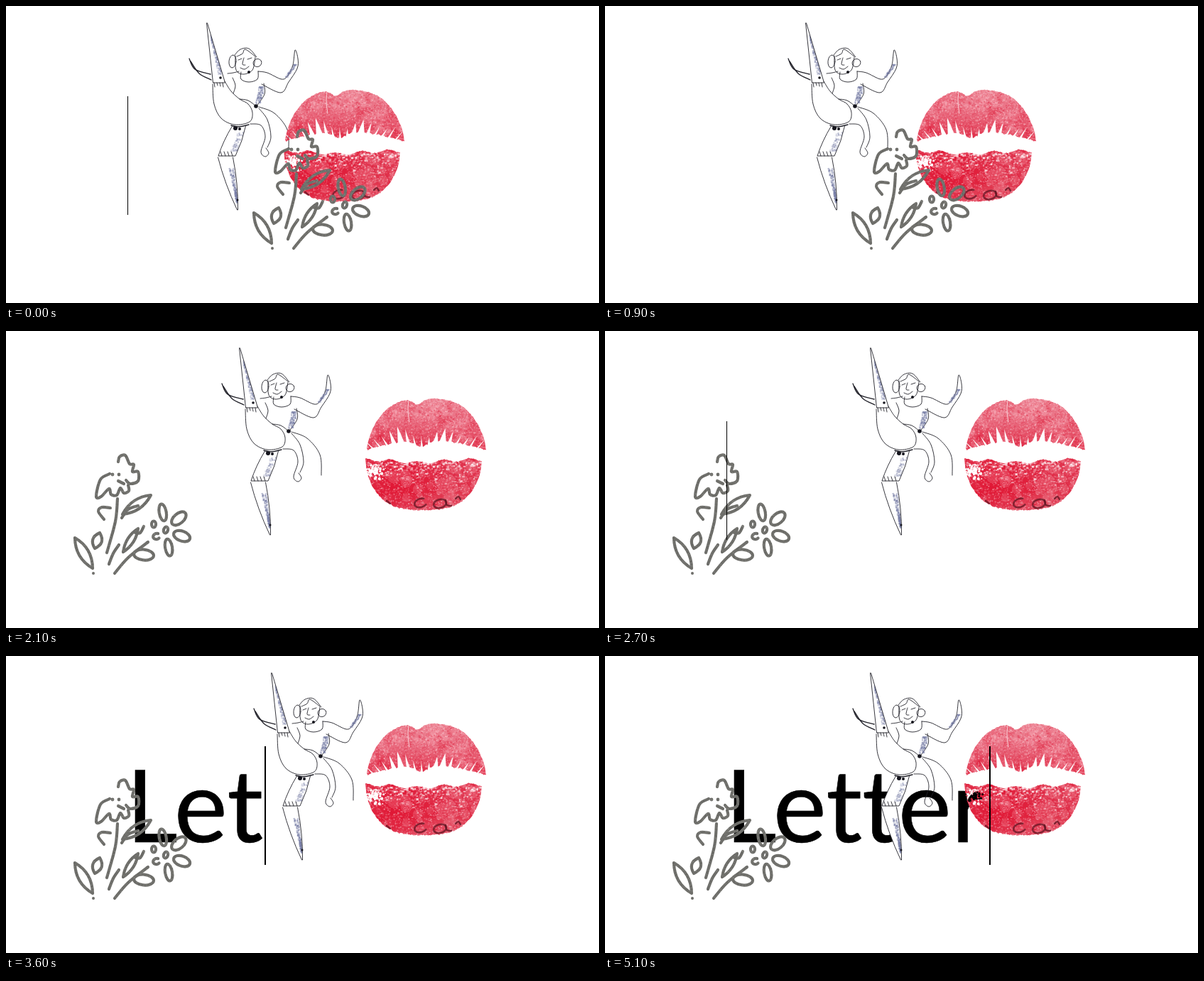
An HTML page with a canvas that plays this animation: 835 px wide and 418 px high, repeating every 5400 ms.

```html
<!DOCTYPE html>
<html lang="en">
<head>
<meta charset="utf-8">
<title>Letter</title>
<style>
html, body { margin: 0; width: 100%; height: 100%; overflow: hidden; background: #fff; }
body { position: relative; }
canvas, #word, #caret { position: absolute; left: 0; top: 0; }
#word {
  left: 169px; top: 121.5px; color: #000; white-space: pre;
  font: 142px/170px Lato, "Open Sans", sans-serif;
  font-variant-ligatures: none; -webkit-text-stroke: .6px #000;
}
#caret { top: 127px; width: 1.4px; height: 167px; background: #000; }
</style>
</head>
<body>
<div id="word"></div>
<canvas id="art" width="835" height="418"></canvas>
<div id="caret"></div>
<script>
const STEP = 300, STEPS = 18, WORD = "Letter";
const word = document.getElementById("word");
const caret = document.getElementById("caret");
const art = document.getElementById("art").getContext("2d");

let seed = 7;
const rnd = () => (seed = (seed * 16807) % 2147483647) / 2147483647;
const spread = (a, b) => a + (b - a) * rnd();
const hump = (u, at, width) => Math.exp(-(((u - at) / width) ** 2));

function layer(draw) {
  const c = document.createElement("canvas");
  c.width = 835;
  c.height = 418;
  const g = c.getContext("2d");
  g.lineCap = g.lineJoin = "round";
  draw(g);
  return c;
}

// Smooth line through every point of "x,y x,y ..."
function curve(g, text) {
  const p = text.split(" ").map(s => s.split(",").map(Number));
  g.beginPath();
  g.moveTo(...p[0]);
  for (let i = 0; i < p.length - 1; i++) {
    const [a, b, c, d] = [p[i - 1] || p[i], p[i], p[i + 1], p[i + 2] || p[i + 1]];
    g.bezierCurveTo(b[0] + (c[0] - a[0]) / 6, b[1] + (c[1] - a[1]) / 6,
                    c[0] - (d[0] - b[0]) / 6, c[1] - (d[1] - b[1]) / 6, ...c);
  }
  g.stroke();
}

function oval(g, x, y, rx, ry, turn = 0, from = 0, to = 2 * Math.PI) {
  g.beginPath();
  g.ellipse(x, y, rx, ry, turn, from, to);
  g.stroke();
}

function dot(g, x, y, r) {
  g.beginPath();
  g.arc(x, y, r, 0, 7);
  g.fill();
}

// Tapered white limb, shaded along its right side
function limb(g, x0, y0, w0, x1, y1, w1, bulge, shade) {
  const mx = (x0 + x1) / 2, my = (y0 + y1) / 2, half = (w0 + w1) / 4 + bulge;
  g.beginPath();
  g.moveTo(x0 - w0 / 2, y0);
  g.quadraticCurveTo(mx - half, my, x1 - w1 / 2, y1);
  g.lineTo(x1 + w1 / 2, y1);
  g.quadraticCurveTo(mx + half, my, x0 + w0 / 2, y0);
  g.fillStyle = "#fff";
  g.fill();
  g.save();
  g.clip();
  for (let i = 0; i < shade; i++) {
    const k = spread(.2, .85);
    g.fillStyle = "rgba(110,118,160,.3)";
    g.fillRect(x0 + (x1 - x0) * k + spread(.1, .9) * (w0 + (w1 - w0) * k) / 2, y0 + (y1 - y0) * k, 2, 2);
  }
  g.restore();
  g.stroke();
}

const dancer = layer(g => {
  g.strokeStyle = "#22222a";
  g.lineWidth = .9;
  limb(g, 328, 169, 19, 311, 211, 24, 3, 60);
  limb(g, 309, 213, 21, 326, 287, 1, 4, 190);
  limb(g, 283, 24, 1, 300, 108, 17, 0, 130);
  [
    "291,110 293,138 303,158 322,167 343,163 347,150 341,138 329,131 317,120 308,106",
    "329,131 341,133 352,141",
    "312,95 320,94 328,92", "319,101 323,112 320,123",
    "322,69 330,61 342,60 353,72", "323,70 324,90 334,96 347,90 351,72",
    "325,71 333,67 337,61 351,71", "327,76 332,74", "340,75 346,73",
    "335,73 333,82 337,83", "330,87 336,89 342,85",
    "331,93 331,103 342,107 354,103 355,92",
    "355,92 368,94 388,103 397,98 404,83 407,62 411,74 410,88 398,107 387,122 360,110",
    "363,109 364,124 352,142",
    "344,166 359,168 365,184 359,205 365,212 370,207 366,200",
    "356,144 368,160 373,184 368,199",
    "356,142 378,151 396,174 398,203"
  ].forEach(t => curve(g, t));
  for (let x = 293; x < 309; x += 4) curve(g, `${x},108 ${x + 1},${112 + x % 3}`);
  for (let x = 302; x < 320; x += 5) curve(g, `${x},205 ${x + 2},211`);
  oval(g, 319, 78, 5, 9, .1);
  oval(g, 354, 80, 6, 5.5, -.4);
  g.lineWidth = 1.4;
  curve(g, "258,74 266,89 288,96");
  curve(g, "260,78 272,95 289,104");
  curve(g, "317,168 327,170 342,167");
  for (let i = 0; i < 120; i++) {
    const k = rnd();
    g.fillStyle = "rgba(110,118,160,.3)";
    g.fillRect(spread(355, 362) - k * k * 5, 112 + k * 24, 2, 2);
    g.fillRect(409 - k * 13 - rnd() * 4, 81 + k * 19, 1.5, 1.5);
  }
  g.fillStyle = "#15151d";
  dot(g, 302, 101, 1.8);
  dot(g, 342, 93, 2);
  dot(g, 352, 141, 2.8);
  dot(g, 323, 172, 3);
  dot(g, 329, 173, 2);
  dot(g, 326, 273, 1.5);
});

function leaf(g, x0, y0, x1, y1, w) {
  const mx = (x0 + x1) / 2, my = (y0 + y1) / 2, len = Math.hypot(x1 - x0, y1 - y0);
  const dx = (y1 - y0) / len * w, dy = (x0 - x1) / len * w;
  g.beginPath();
  g.moveTo(x0, y0);
  g.quadraticCurveTo(mx + dx, my + dy, x1, y1);
  g.quadraticCurveTo(mx - dx, my - dy, x0, y0);
  g.stroke();
}

const flower = layer(g => {
  g.strokeStyle = g.fillStyle = "#6f6f6b";
  g.lineWidth = 4.2;
  // Rose
  [
    "410,184 412,177 420,175 426,187 432,188 430,198 438,198 438,211 427,215 421,210",
    "398,201 385,209 379,233 386,233 397,222 400,230 408,231 413,221 418,228 425,225 424,217",
    "410,211 418,215"
  ].forEach(t => curve(g, t));
  for (const x of [402, 411]) dot(g, x, 202, 2.4);
  // Stems
  curve(g, "409,236 406,268 394,312");
  curve(g, "405,341 424,319 452,297");
  curve(g, "397,328 403,313 411,301");
  curve(g, "434,284 441,284 446,275");
  // Leaves
  curve(g, "399,249 387,248 382,254 390,265");
  curve(g, "415,263 424,251 438,246");
  leaf(g, 416, 258, 456, 231, 13);
  leaf(g, 374, 334, 349, 291, 14);
  leaf(g, 377, 306, 384, 284, 13);
  leaf(g, 417, 311, 438, 278, 9);
  dot(g, 375, 341, 2);
  // Daisy
  for (let i = 0; i < 4; i++) {
    const a = -1.75 + i * 1.05;
    oval(g, 477 + 24 * Math.cos(a), 280 + 25 * Math.sin(a), 12, i % 3 ? 7 : 5, a);
  }
  oval(g, 446, 315, 14, 7.5, .1);
  oval(g, 460, 272, 3, 4.5);
  oval(g, 464, 289, 5, 4, -.3, 1, 5.4);
  oval(g, 477, 280, 3, 4.5, .3);

  g.globalCompositeOperation = "source-atop";
  for (let i = 0; i < 7000; i++) {
    g.fillStyle = rnd() < .5 ? "rgba(80,80,76,.3)" : "rgba(160,160,152,.3)";
    g.fillRect(spread(345, 515), spread(172, 344), 1.5, 1);
  }
});

// Edges of the mouth for u from -1 to 1
const arch = (u, q) => Math.max(0, 1 - Math.abs(u) ** 3) ** q;
const edges = {
  upper: [u => 166 - 71 * arch(u, .7) + 8 * hump(u, -.15, .11),
          u => 168 - 14 * (1 - u * u) + 9 * hump(u, -.08, .14)],
  lower: [u => 181 + 4 * hump(u, -.1, .5) + 2 * Math.sin(u * 14),
          u => 184 + 68 * arch(u, .6)]
};

function lipShape([top, bottom], cx, half) {
  const path = new Path2D();
  for (let u = -1; u <= 1; u += .02) path.lineTo(cx + half * u, top(u) + spread(-.7, .7));
  for (let u = 1; u >= -1; u -= .02) path.lineTo(cx + half * u, bottom(u) + spread(-1, 1));
  path.closePath();
  return path;
}

const lips = layer(g => {
  const tint = g.createLinearGradient(0, 95, 0, 252);
  ["#ee8b9a", "#ea7184", "#e54f66", "#e0304a", "#e13650", "#e0344c", "#e6687a"]
    .forEach((c, i) => tint.addColorStop(i / 6, c));
  g.fillStyle = tint;
  g.fill(lipShape(edges.upper, 592, 84));
  g.fill(lipShape(edges.lower, 588, 82));

  g.globalCompositeOperation = "source-atop";
  const glow = g.createRadialGradient(550, 215, 5, 550, 215, 80);
  glow.addColorStop(0, "rgba(226,8,40,.6)");
  glow.addColorStop(1, "rgba(226,8,40,0)");
  g.fillStyle = glow;
  g.fillRect(500, 170, 180, 90);

  // Soft blotches, then fine grain
  for (let i = 0; i < 240; i++) {
    const x = spread(505, 678), y = spread(95, 252);
    const pale = rnd() < .4 + (x - 590) / 300;
    g.fillStyle = pale ? "rgba(255,190,200,.2)" : "rgba(222,15,45,.16)";
    dot(g, x, y, spread(2, 9));
  }
  for (let i = 0; i < 7000; i++) {
    const pale = rnd() < .55;
    g.fillStyle = pale ? `rgba(255,215,222,${spread(.1, .45)})` : `rgba(218,15,48,${spread(.1, .35)})`;
    g.fillRect(spread(503, 678), spread(93, 255), spread(.8, 2.3), spread(.8, 2));
  }
  for (let i = 0; i < 220; i++) {
    g.fillStyle = `rgba(255,242,244,${spread(.3, .85)})`;
    g.fillRect(spread(508, 670), 184 + rnd() * rnd() * 40, spread(1, 4), spread(1, 3));
  }

  g.strokeStyle = "rgba(90,15,28,.7)";
  g.lineWidth = 2.6;
  oval(g, 584, 242, 9, 6, -.3, .8, 5.4);
  oval(g, 611, 243, 9, 6, -.25);
  curve(g, "619,238 621,245 627,246");
  curve(g, "633,236 637,233 640,237");
  curve(g, "536,239 541,243");

  // Creases fan out from the mouth
  g.globalCompositeOperation = "destination-out";
  g.fillStyle = "#000";
  for (let u = -.88; u < .95; u += .115) {
    const x = 592 + 84 * u, y = edges.upper[1](u) + 2;
    const deep = hump(u, -.45, .12) + hump(u, .25, .12);
    const h = spread(10, 18) + 9 * deep, w = 1.6 + 3.5 * deep;
    g.beginPath();
    g.moveTo(x - w, y);
    g.lineTo(x + u * 14, y - h);
    g.lineTo(x + w, y);
    g.fill();
  }
  g.lineWidth = 1;
  curve(g, "568,128 566,112 567,98");
  for (let i = 0; i < 80; i++)
    dot(g, 518 + (rnd() + rnd() - 1) * 14, 198 + (rnd() + rnd() - 1) * 11, spread(.5, 2));
});

let shown = -1;
function frame() {
  const s = Math.floor(performance.now() / STEP) % STEPS;
  if (s !== shown) {
    shown = s;
    art.clearRect(0, 0, 835, 418);
    art.drawImage(dancer, s < 7 ? 0 : s < 8 ? 46 : 91, 0);
    art.drawImage(lips, s < 3 ? -115 : s < 4 ? -69 : 0, s < 4 ? 23 : 0);
    art.drawImage(flower, s < 5 ? 0 : s < 6 ? -114 : -252, 0);
    word.textContent = WORD.slice(0, Math.max(0, s - 9));
    caret.style.left = 171 + word.getBoundingClientRect().width + "px";
    caret.hidden = s === 1 || s === 16 || (s > 2 && s < 9);
  }
  requestAnimationFrame(frame);
}
frame();
</script>
</body>
</html>
```
